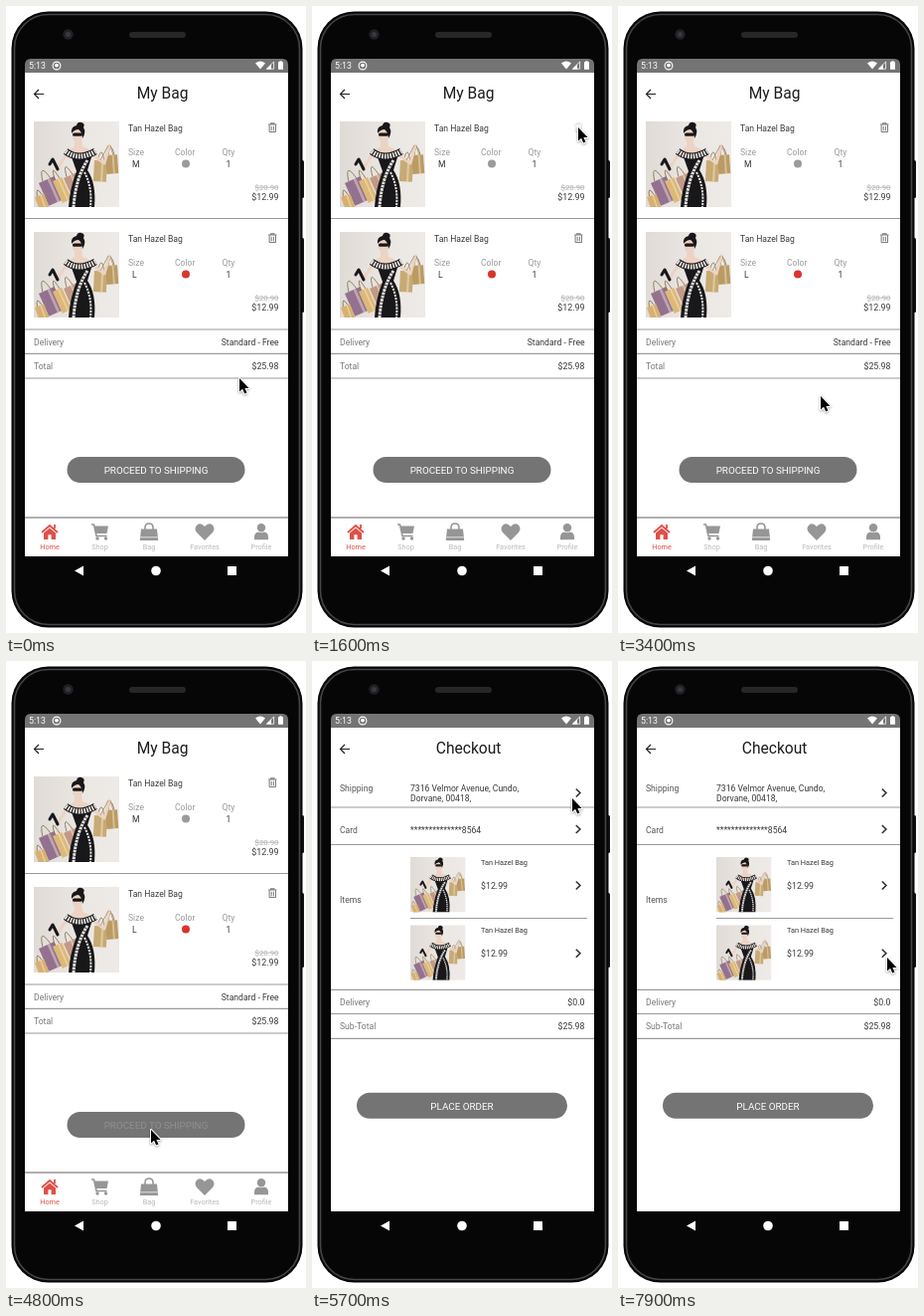
Write an HTML page that moves like this. It is 302x630 px and loops after 8 s.

```html
<!DOCTYPE html>
<html lang="en">
<head>
<meta charset="utf-8">
<title>Bag and checkout</title>
<style>
  html, body { margin: 0; width: 100%; height: 100%; overflow: hidden; background: #fff; }
  svg { display: block; width: 302px; height: 630px; }
  text { font-family: Roboto, Arial, sans-serif; }
  #cursor { filter: drop-shadow(0 1px 1px rgba(0, 0, 0, .35)); }
</style>
</head>
<body>
<svg id="stage" viewBox="0 0 302 630" xmlns="http://www.w3.org/2000/svg"></svg>
<script>
const DARK = '#383838', MID = '#777', SOFT = '#9a9a9a', RED = '#df5048';
const ITEM = 'Tan Hazel Bag';

const text = (x, y, str, { size = 8.6, fill = DARK, anchor = 'start', extra = '' } = {}) =>
  `<text x="${x}" y="${y}" font-size="${size}" fill="${fill}" text-anchor="${anchor}" ${extra}>${str}</text>`;
const right = (y, str, opt = {}) => text(274.5, y, str, { ...opt, anchor: 'end' });
const rect = (x, y, w, h, fill, rx = 0) =>
  `<rect x="${x}" y="${y}" width="${w}" height="${h}" rx="${rx}" fill="${fill}"/>`;
const ring = (x, y, w, h, rx, color, width) =>
  `<rect x="${x}" y="${y}" width="${w}" height="${h}" rx="${rx}" fill="none" stroke="${color}" stroke-width="${width}"/>`;
const circle = (x, y, r, fill) => `<circle cx="${x}" cy="${y}" r="${r}" fill="${fill}"/>`;
const path = (d, fill, extra = '') => `<path d="${d}" fill="${fill}" ${extra}/>`;
const stroke = (d, color, w = 1, extra = '') =>
  path(d, 'none', `stroke="${color}" stroke-width="${w}" ${extra}`);
const at = (x, y, body, extra = '') => `<g transform="translate(${x} ${y})" ${extra}>${body}</g>`;
const line = (y, x1 = 19, x2 = 284) => stroke(`M${x1} ${y}H${x2}`, '#9a9a9a', 1.2);
const picture = (x, y, size) => `<use href="#pic" x="${x}" y="${y}" width="${size}" height="${size}"/>`;

// Flat fashion figure with shopping bags, drawn in an 86 unit square
function figure() {
  const bag = (x, y, w, h, fill, turn) =>
    `<g transform="translate(${x} ${y}) rotate(${turn})">` +
    stroke(`M${w * .25} 0Q${w * .5} ${-h * .8} ${w * .75} 0`, '#8a7350', .8) +
    rect(0, 0, w, h, fill) + rect(w * .55, 0, w * .16, h, 'rgba(255,245,225,.4)') + '</g>';
  const skin = '#ecd3c3', black = '#18171a', pale = '#e6e2de';
  return rect(0, 0, 86, 86, 'url(#wall)') +
    bag(61, 39, 13, 21, '#c7aa74', 3) + bag(72, 34, 12, 19, '#bb9b64', -4) +
    stroke('M60 34L71 42L76 24', skin, 3, 'stroke-linejoin="round" stroke-linecap="round"') +
    stroke('M75 24L67 39M77 24L80 34', '#a08a68', .8) +
    bag(5, 62, 17, 25, '#93718f', -24) + bag(19, 60, 10, 24, '#dcb978', -24) +
    bag(30, 57, 13, 24, '#c29a86', -24) + bag(1, 76, 10, 14, '#d7b071', -20) +
    stroke('M34 31L24 47L20 40', skin, 3, 'stroke-linejoin="round"') +
    stroke('M24 48L19 38L16 43', black, 3, 'stroke-linecap="round" stroke-linejoin="round"') +
    path('M41 18H48L49 25L60 30L58 37H34L31 32L41 25Z', skin) +
    `<ellipse cx="44" cy="14" rx="5.3" ry="7" fill="${skin}"/>` +
    path('M38 12Q37 5 43 4Q44 0 48 1Q52 2 50 6Q53 11 49 17Q49 11 45 8Q41 8 38 12Z', black) +
    rect(39, 11.4, 10, 3.4, black, 1.6) +
    path('M38 36H58L54 49Q63 62 61 86H35Q36 68 43 50Z', black) +
    stroke('M32 30Q45 40 62 30', black, 7) +
    stroke('M32 30Q45 40 62 30', pale, 5, 'stroke-dasharray="1.7 1.1"') +
    stroke('M54 39Q42 57 40 86', pale, 3, 'stroke-dasharray="2.6 .8"') +
    stroke('M51 51Q59 66 57 86', pale, 2, 'stroke-dasharray="2.2 1"');
}

const trash = (x, y, id) => at(x, y,
  stroke('M-4.2 -3.3H4.2M-1.6 -3.5V-4.6H1.6V-3.5', MID, 1.1) +
  stroke('M-3.2 -3V4.3H3.2V-3M-1.1 -1.5V3M1.1 -1.5V3', MID, 1), `id="${id}"`);
const chevron = y => stroke(`M265.8 ${y - 4}L269.9 ${y}L265.8 ${y + 4}`, '#333', 1.6);

const header = title =>
  rect(19, 67, 265, 486, '#fff') +
  stroke('M38 88.5H28.6M33 84L28.5 88.5L33 93', '#222', 1.2) +
  text(157.6, 93, title, { size: 15.6, fill: '#1c1c1c', anchor: 'middle' });

const pill = (x, y, w, label, id) =>
  rect(x, y, w, 26, '#747474', 13) +
  text(x + w / 2, y + 17, label, { size: 9.85, fill: '#fff', anchor: 'middle', extra: `id="${id}"` });

function bagItem(dy, size, color, id) {
  const label = { fill: SOFT };
  return at(0, dy,
    picture(28, 116, 86) + text(123, 125.5, ITEM) + trash(268.3, 122.3, id) +
    text(123, 150, 'Size', label) + text(170, 150, 'Color', label) + text(217.5, 150, 'Qty', label) +
    text(127, 161.5, size) + circle(181, 158.5, 4, color) + text(221.5, 161.5, '1') +
    right(184.5, '$20.90', { size: 7.8, fill: '#b0b0b0', extra: 'text-decoration="line-through"' }) +
    right(195, '$12.99', { size: 8.9 }));
}

function tabs() {
  const names = [['Home', 44], ['Shop', 94.5], ['Bag', 144], ['Favorites', 200], ['Profile', 257]];
  const g = '#969696';
  const icons = [
    path('M-6 1.5L0 -3.6L6 1.5V8H1.6V3.2H-1.6V8H-6Z', RED) +
      stroke('M-8 1L0 -6L8 1M5 -7V-3', RED, 1.8),
    stroke('M-8.5 -7H-6L-3.5 4.5H7', g, 1.6) + path('M-5.5 -5.5H8.5L7 2H-4Z', g) +
      circle(-2.5, 7, 1.7, g) + circle(6, 7, 1.7, g),
    path('M-8 -2.5H8L9.2 9H-9.2Z', g) + stroke('M-4 1V-4Q-4 -8 0 -8Q4 -8 4 -4V1', g, 1.6) +
      stroke('M-8.8 5.8H8.8', '#fff', .7),
    path('M0 9L-8 1Q-11 -3 -8 -6.3Q-4 -9.6 0 -5Q4 -9.6 8 -6.3Q11 -3 8 1Z', g),
    circle(0, -3.8, 4.2, g) + path('M-7 8.3V5Q-6.5 .7 -3 .4Q0 2 3 .4Q6.5 .7 7 5V8.3Z', g)
  ];
  return stroke('M19 514H284', '#969696', 1.5) + names.map(([name, x], i) =>
    at(x, 528, icons[i]) +
    text(x, 545.7, name, { size: 7.3, fill: i ? '#b8b8b8' : RED, anchor: 'middle' })).join('');
}

const bagScreen = () => header('My Bag') +
  bagItem(0, 'M', '#9b9b9b', 'trash1') + line(213.5) +
  bagItem(111, 'L', '#d9342f', 'trash2') + line(325) +
  text(28, 341, 'Delivery', { fill: MID }) + right(341, 'Standard - Free') + line(349.3) +
  text(28, 365, 'Total', { fill: MID }) + right(365, '$25.98', { size: 8.8 }) + line(374) +
  pill(61.5, 453, 179, 'PROCEED TO SHIPPING', 'proceed') + tabs();

const orderItem = dy => at(0, dy,
  picture(99, 197, 55.5) + text(170, 205, ITEM, { size: 7.35 }) +
  text(170, 228.5, '$12.99', { size: 8.8 }) + chevron(225.5));

const checkoutScreen = () => header('Checkout') +
  text(28, 131, 'Shipping', { fill: '#555' }) +
  text(99, 131, '7316 Velmor Avenue, Cundo,') + text(99, 141, 'Dorvane, 00418,') +
  chevron(132.5) + line(147) +
  text(28, 172.5, 'Card', { fill: '#555' }) + text(99, 172.5, '*'.repeat(14) + '8564') +
  chevron(169) + line(184.5) +
  text(28, 243, 'Items', { fill: '#555' }) + orderItem(0) + line(258.5, 99, 277) + orderItem(68.3) +
  line(330.3) + text(28, 346, 'Delivery', { fill: MID }) + right(346, '$0.0', { size: 8.8 }) +
  line(354.5) + text(28, 370, 'Sub-Total', { fill: MID }) + right(370, '$25.98', { size: 8.8 }) +
  line(379.3) + pill(45, 433.7, 212, 'PLACE ORDER', 'place');

const phone = () =>
  rect(295, 155, 5, 38, '#141414', 1.5) + rect(295, 233, 5, 75, '#141414', 1.5) +
  rect(5.5, 5.5, 293, 619, '#060606', 37) +
  ring(8.5, 8.5, 287, 613, 34, '#464646', 1.6) +
  circle(62.5, 28.5, 5.2, '#1f2124') + circle(62.5, 28.5, 2.6, '#36393e') +
  rect(124, 26, 57, 6, '#272727', 3) +
  path('M19 67V59Q19 53 25 53H278Q284 53 284 59V67Z', '#747474') +
  text(23, 63, '5:13', { size: 8.8, fill: '#fff' }) +
  `<circle cx="51" cy="60" r="3.9" fill="none" stroke="#fff" stroke-width="1.1"/>` +
  circle(51, 59.6, 1.9, '#fff') +
  path('M251 57.4Q256 53.4 261 57.4L256 63.6Z', '#fff') +
  stroke('M269.6 56V63.2H262.4Z', '#fff', .8) + path('M267 58.5V63.5H262Z', '#fff') +
  path('M274 56.3H275.3V55.3H277.7V56.3H279V63.8H274Z', '#fff') +
  path('M78 562.5V572.5L69 567.5Z', '#fff') + circle(151, 567.5, 4.8, '#fff') +
  rect(223, 563, 9, 9, '#fff');

const stage = document.getElementById('stage');
stage.innerHTML = `<defs>
  <linearGradient id="wall"><stop offset="0" stop-color="#e0dbd6"/>
  <stop offset=".6" stop-color="#ebe7e3"/><stop offset="1" stop-color="#eeeae7"/></linearGradient>
  <symbol id="pic" viewBox="0 0 86 86">${figure()}</symbol>
  <clipPath id="view"><rect x="19" y="67" width="265" height="486"/></clipPath></defs>` +
  phone() +
  `<g clip-path="url(#view)"><g id="bag">${bagScreen()}</g><g id="checkout">${checkoutScreen()}</g></g>` +
  path('M0 0V13.6L3.1 10.8L5.2 15.6L7.5 14.6L5.4 9.9H9.6Z', '#000',
    'id="cursor" stroke="#fff" stroke-width="2" paint-order="stroke" stroke-linejoin="round"');

const [bag, checkout, cursor, trash1, proceed] =
  ['bag', 'checkout', 'cursor', 'trash1', 'proceed'].map(id => document.getElementById(id));

// Pointer path: time, x, y
const POINTER = [
  [0, 235, 374], [100, 242, 334], [200, 242, 334], [400, 254, 146], [500, 254, 146],
  [600, 262, 131], [1000, 268, 122], [1700, 268, 122], [2200, 274, 160], [2600, 270, 226],
  [2700, 270, 226], [3200, 221, 364], [3300, 221, 364], [3400, 204, 392], [3500, 174, 442],
  [3600, 174, 442], [4000, 146, 471], [5200, 146, 471], [5300, 175, 392], [5500, 244, 168],
  [5600, 244, 168], [5700, 262, 138], [6000, 267, 133], [6500, 269, 137], [6700, 271, 208],
  [7300, 271, 213], [7700, 271, 298], [8000, 271, 298]
];
const LOOP = 8000, STEP = 100;
const clamp = v => Math.max(0, Math.min(1, v));

function pointerAt(t) {
  const i = POINTER.findIndex(k => k[0] > t);
  const [a, b] = [POINTER[i - 1], POINTER[i]];
  const p = (t - a[0]) / (b[0] - a[0]);
  return [a[1] + (b[1] - a[1]) * p, a[2] + (b[2] - a[2]) * p];
}

function render(ms) {
  const t = Math.floor((ms % LOOP) / STEP) * STEP;
  const [x, y] = pointerAt(t);
  cursor.setAttribute('transform', `translate(${x} ${y})`);
  trash1.setAttribute('opacity', t < 1600 ? 1 : .2 + .8 * clamp((t - 1700) / 300));
  proceed.setAttribute('opacity', t < 4400 ? 1 : .2);
  const p = clamp((t - 4800) / 200);
  checkout.setAttribute('opacity', p);
  checkout.setAttribute('transform', `translate(0 ${12 * (1 - p)})`);
  bag.setAttribute('visibility', p < 1 ? 'visible' : 'hidden');
}

const start = performance.now();
function tick() {
  render(performance.now() - start);
  requestAnimationFrame(tick);
}
tick();
</script>
</body>
</html>
```
